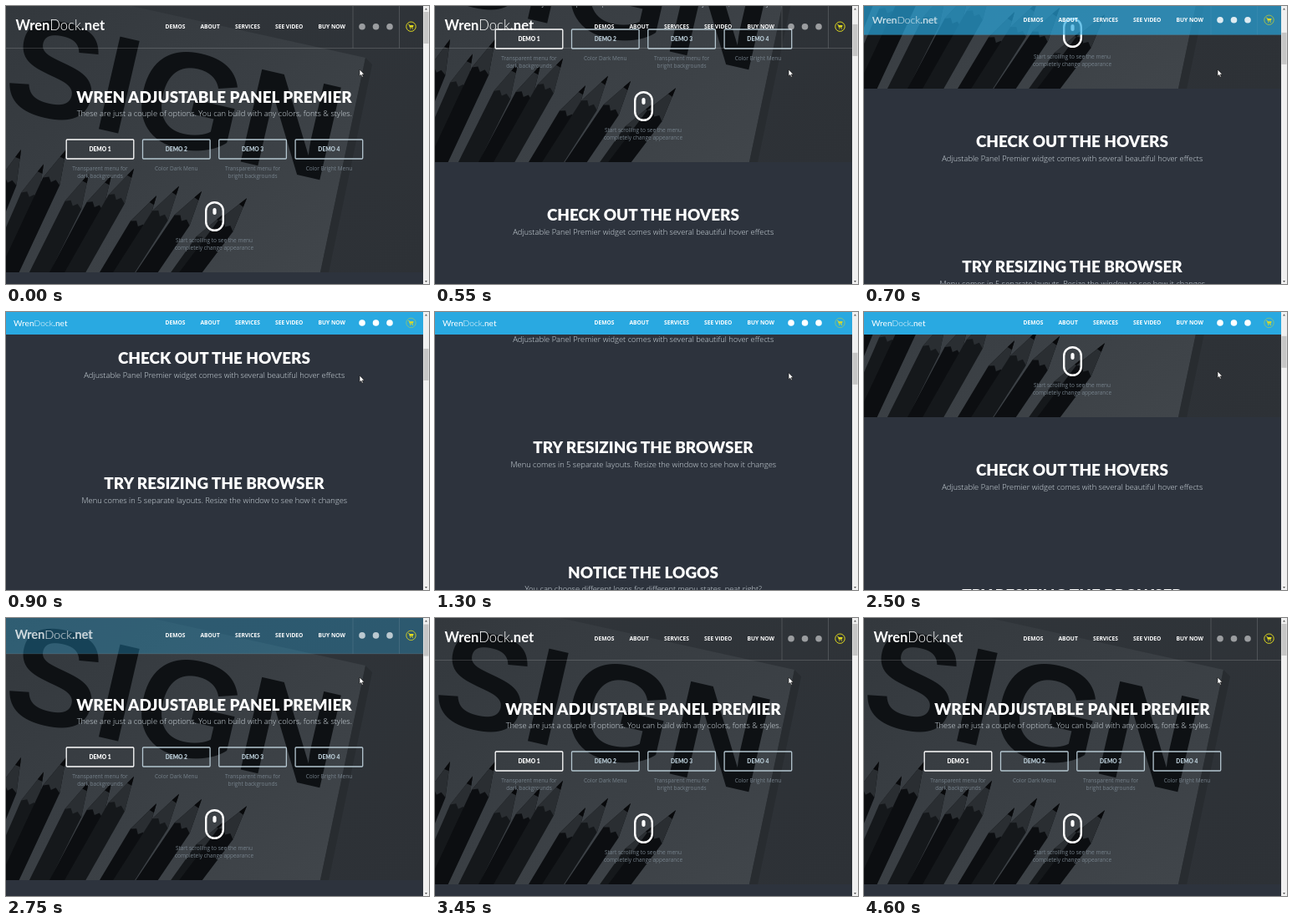
These frames come from a looping animation (506x333 px, 4650 ms). An HTML page:

```html
<!DOCTYPE html>
<html lang="en">
<head>
<meta charset="utf-8">
<title>Sticky menu demo</title>
<style>
  html, body { margin: 0; width: 100%; height: 100%; overflow: hidden; background: #2d333d; }
  svg { display: block; width: 506px; height: 333px; }
  text { fill: #fff; white-space: pre; }
  .mid { text-anchor: middle; }
  .h { font: 900 18.9px Lato, sans-serif; }
  .sub { font: 300 9.33px "Open Sans", sans-serif; fill: #d3dce2; }
  .btn { font: 900 6.67px Lato, sans-serif; }
  .cap { font: 400 6.5px "Open Sans", sans-serif; fill: #76828c; }
  .nav { font: 700 6.67px "Open Sans", sans-serif; }
  .logo { font: 400 16.6px Lato, sans-serif; }
  .bold { font-weight: 700; }
  .light { font-weight: 300; }
  .print { font: 700 165px "Liberation Sans", Arial, sans-serif; fill: #0e1114; }
</style>
</head>
<body>
<svg viewBox="0 0 506 333">
  <defs>
    <linearGradient id="desk" x1="0" y1="0" x2="1" y2="1">
      <stop offset="0" stop-color="#30353a"/><stop offset="1" stop-color="#2d3136"/>
    </linearGradient>
    <linearGradient id="paper" x1="0" y1="0" x2="1" y2="1">
      <stop offset="0" stop-color="#33383d"/><stop offset="1" stop-color="#41464b"/>
    </linearGradient>
    <clipPath id="photo"><path d="M0 0H499V319H0Z"/></clipPath>
  </defs>
  <rect width="506" height="333" fill="#2d333d"/>
  <g id="page">
    <g clip-path="url(#photo)">
      <rect width="499" height="319" fill="url(#desk)"/>
      <path d="M0 0H150L430 62L376 319H0Z" fill="url(#paper)"/>
      <path d="M430 62L376 319H386L438 70Z" fill="#282c30"/>
      <text class="print" transform="translate(-7 120) rotate(13)">SIGN</text>
      <g id="pencils"></g>
    </g>
    <g id="content"></g>
    <rect x="239.2" y="235.2" width="20.6" height="33.6" rx="10.3" fill="none" stroke="#fff" stroke-width="2.4"/>
    <rect x="247.4" y="242" width="4.2" height="8" rx="2.1" fill="#fff"/>
  </g>
  <g id="header">
    <rect id="bar" width="499" fill="#29a9e1"/>
    <path id="lines" fill="none" stroke="#fff" stroke-opacity=".2" stroke-width=".8"/>
    <g id="logo">
      <text id="logoBig" class="logo"><tspan class="bold">Wren</tspan><tspan class="light">Dock</tspan><tspan class="bold">.net</tspan></text>
      <text id="logoSmall" class="logo">Wren<tspan class="light">Dock</tspan>.net</text>
    </g>
    <g id="menu">
      <g id="social" fill="#fff">
        <circle cx="426" r="3.8"/><circle cx="442.5" r="3.8"/><circle cx="459" r="3.8"/>
      </g>
      <g transform="translate(484.5 0)" fill="none" stroke="#e3dc1e">
        <circle id="ring" r="5.7"/>
        <path d="M-3.4 -2.5H-2.2L-1.2 1.2H2.4" stroke-width=".8"/>
        <path d="M-2 -1.8H3.2L2.4 .6H-1.4Z" fill="#e3dc1e" stroke="none"/>
        <path d="M-1.2 2.5h.9M1.6 2.5h.9" stroke-width="1"/>
      </g>
    </g>
  </g>
  <rect x="499" width="7" height="333" fill="#f0f0f0"/>
  <rect id="thumb" x="499.5" width="6" height="38" fill="#c6c6c6"/>
  <path d="M501 4.5l1.5-2l1.5 2zM501 329l1.5 2l1.5-2z" fill="#555"/>
  <path id="cursor" d="M0 0V8L1.8 6.4L3 9.2L4.3 8.6L3.1 5.9H5.6Z" fill="#fff" stroke="#111" stroke-width=".6"/>
</svg>
<script>
const LOOP = 4650, STEP = 50;
const $ = id => document.getElementById(id);
const text = (cls, x, y, s, extra = '') => `<text class="${cls}" x="${x}" y="${y}" ${extra}>${s}</text>`;
const mid = (cls, x, y, s, extra) => text(cls + ' mid', x, y, s, extra);

// Page content
const sections = [
  [115.5, 'WREN ADJUSTABLE PANEL PREMIER', 'These are just a couple of options. You can build with any colors, fonts &amp; styles.', 16.3],
  [389, 'CHECK OUT THE HOVERS', 'Adjustable Panel Premier widget comes with several beautiful hover effects', 17],
  [539, 'TRY RESIZING THE BROWSER', 'Menu comes in 5 separate layouts. Resize the window to see how it changes', 17],
  [689, 'NOTICE THE LOGOS', 'You can choose different logos for different menu states, neat right?', 16]
];
const demos = [
  ['Transparent menu for', 'dark backgrounds'], ['Color Dark Menu'],
  ['Transparent menu for', 'bright backgrounds'], ['Color Bright Menu']
];
let html = sections.map(([y, title, sub, gap]) =>
  mid('h', 249, y, title) + mid('sub', 249.3, y + gap, sub)).join('');
demos.forEach((lines, i) => {
  const x = 112.5 + 91.3 * i, color = i ? '#b4c6d0' : '#fff';
  html += `<rect x="${x - 40.3}" y="160" width="80.6" height="23" rx="1" fill="none" stroke="${color}" stroke-width="1.3"/>`
    + mid('btn', x, 173.8, 'DEMO ' + (i + 1), `style="fill:${color}"`)
    + lines.map((s, k) => mid('cap', x, 197 + 9.2 * k, s)).join('');
});
html += mid('cap', 249, 282.8, 'Start scrolling to see the menu')
  + mid('cap', 249, 292, 'completely change appearance');
$('content').innerHTML = html;

$('pencils').innerHTML = Array.from({ length: 11 }, (_, i) => {
  const x = 18 + 27 * i, y = 172 + 7 * i + 14 * Math.sin(i * 2.3);
  return `<g transform="translate(${x} ${y}) rotate(${22 + 1.5 * i})">
    <path d="M0 0L11 42V240H-11V42Z" fill="${i % 2 ? '#15181b' : '#0c0e11'}"/>
    <path d="M0 0L11 42L4 38L0 43L-5 38L-11 42Z" fill="#2a2e32"/>
    <path d="M0 0L3 11H-3Z" fill="#08090b"/></g>`;
}).join('');

$('menu').insertAdjacentHTML('afterbegin',
  [[190.5, 'DEMOS'], [232.5, 'ABOUT'], [274, 'SERVICES'], [322, 'SEE VIDEO'], [373.5, 'BUY NOW']]
    .map(([x, s]) => text('nav', x, 2.4, s)).join(''));

// Motion
const scrollKeys = [[0, 0], [50, 2], [150, 12], [300, 43], [550, 132], [700, 220], [900, 327], [1000, 357],
  [1100, 370], [2200, 370], [2300, 324], [2500, 193], [2650, 73], [2750, 5], [2800, 0], [LOOP, 0]];
const cursorKeys = [[0, 76], [1200, 76], [1350, 71], [LOOP, 71]];
const mix = (a, b, k) => a + (b - a) * k;
const track = (keys, t) => {
  const i = keys.findIndex(k => k[0] > t), [t0, a] = keys[i - 1], [t1, b] = keys[i];
  return mix(a, b, (t - t0) / (t1 - t0));
};
const easeOut = (t, start, length) => {
  const k = Math.min(1, Math.max(0, (t - start) / length));
  return 1 - (1 - k) ** 2;
};
const set = (id, attrs) => {
  for (const name in attrs) $(id).setAttribute(name, attrs[name]);
};

function draw(t) {
  const scroll = track(scrollKeys, t);
  // 1 = tall transparent header, 0 = compact blue bar
  const open = 1 - easeOut(t, 570, 300) + easeOut(t, 2600, 350);
  const height = mix(27, 50.5, open);
  set('page', { transform: `translate(0 ${-scroll})` });
  set('bar', { height, opacity: 1 - open });
  set('lines', { d: `M0 ${height}H499M415 0V${height}M470.5 0V${height}`, opacity: open });
  set('logo', { transform: `translate(${mix(9, 11.5, open)} ${mix(16.7, 29.3, open)}) scale(${mix(.613, 1, open)})` });
  set('logoBig', { opacity: open });
  set('logoSmall', { opacity: 1 - open });
  set('menu', { transform: `translate(0 ${mix(13, 24.7, open)})` });
  set('social', { opacity: mix(1, .52, open) });
  set('ring', { 'stroke-opacity': mix(.45, 1, open) });
  set('thumb', { y: 7 + scroll * .113 });
  set('cursor', { transform: `translate(423 ${track(cursorKeys, t)})` });
}

function tick() {
  draw(Math.floor(performance.now() % LOOP / STEP) * STEP);
  requestAnimationFrame(tick);
}
tick();
</script>
</body>
</html>
```
